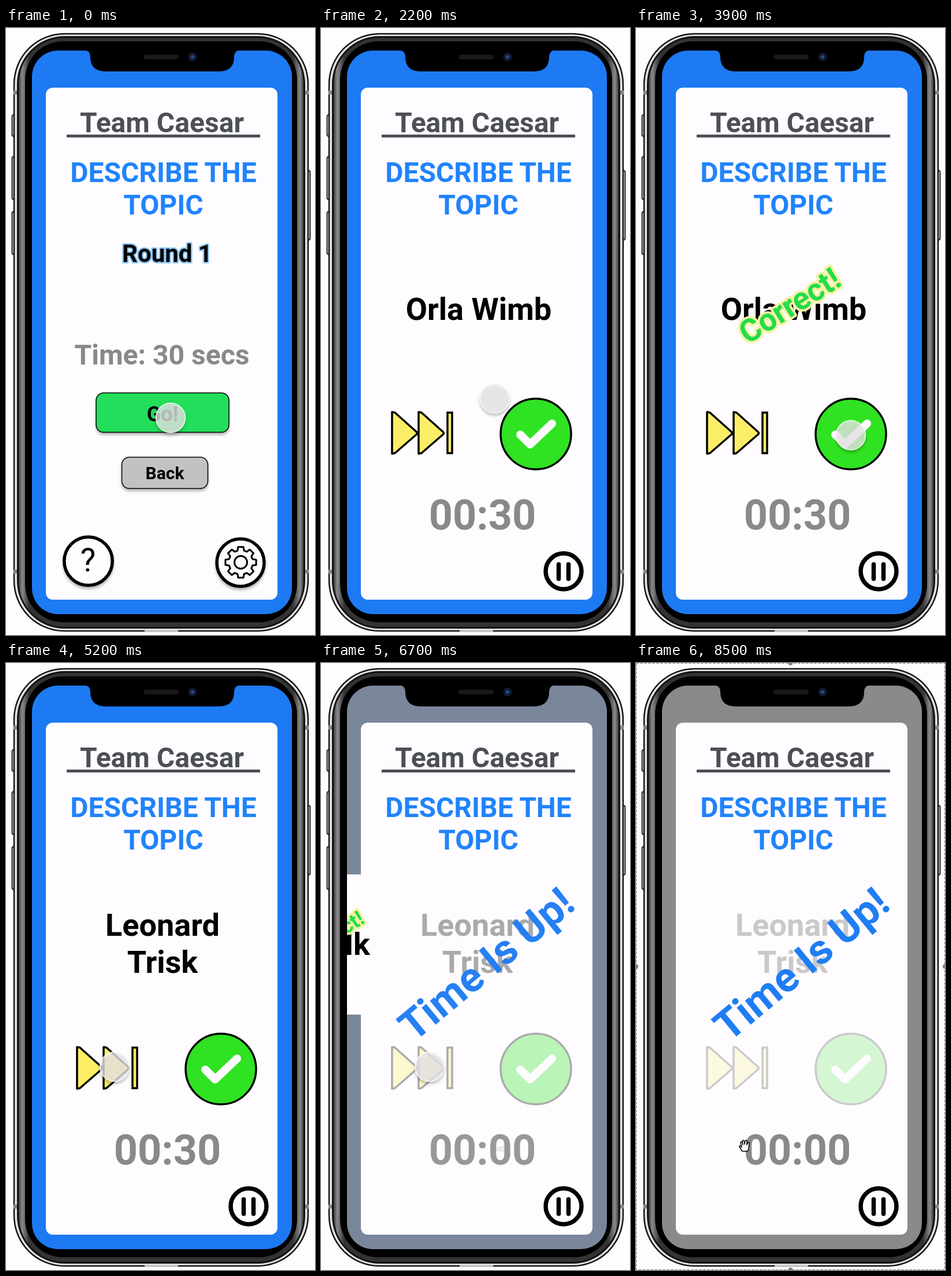
Animation, 535 px wide and 1048 px high, one loop 8600 ms. Source, as an HTML page:

```html
<!DOCTYPE html>
<html lang="en">
<head>
<meta charset="utf-8">
<title>Describe the topic</title>
<style>
  html, body { margin: 0; width: 100%; height: 100%; overflow: hidden; background: #fefcff; }
  svg { display: block; width: 535px; height: 1048px; }
  text { font: 700 48px Roboto, sans-serif; text-anchor: middle; }
  .topic text { font-size: 54px; }
  .clock { font-size: 72px; fill: #8a888a; }
  .paper { fill: #fefcff; }
  .shadow { filter: drop-shadow(0 4px 2px rgba(0, 0, 0, .27)); }
  .stamp { fill: #23dc4d; stroke: #f5f2a0; stroke-width: 8; paint-order: stroke; stroke-linejoin: round; }
</style>
</head>
<body>
<svg viewBox="0 0 535 1048">
  <defs>
    <clipPath id="display"><rect x="45" y="39" width="450" height="973" rx="45"/></clipPath>
    <linearGradient id="rim">
      <stop offset="0" stop-color="#2b2a2b"/><stop offset=".015" stop-color="#8b898b"/>
      <stop offset=".04" stop-color="#333"/><stop offset=".96" stop-color="#333"/>
      <stop offset=".985" stop-color="#8b898b"/><stop offset="1" stop-color="#2b2a2b"/>
    </linearGradient>
  </defs>

  <!-- phone body -->
  <g fill="#e9e7ea" stroke="#222" stroke-width="2">
    <rect x="10.5" y="150" width="8" height="37" rx="3"/>
    <rect x="10.5" y="222" width="8" height="74" rx="3"/>
    <rect x="10.5" y="317" width="8" height="74" rx="3"/>
    <rect x="518" y="246" width="8.5" height="120" rx="3"/>
  </g>
  <rect x="14" y="10" width="509" height="1031" rx="87" fill="#e3e1e4" stroke="#151515" stroke-width="2.5"/>
  <g fill="#858386">
    <path d="M13 108h9v7h-9zM515 108h9v7h-9zM13 935h9v7h-9zM515 935h9v7h-9z"/>
    <rect x="240" y="1039" width="58" height="3" fill="#c9c7ca"/>
  </g>
  <rect x="20.5" y="15.5" width="496" height="1020" rx="81" fill="url(#rim)" stroke="#111" stroke-width="3"/>
  <rect x="33" y="23" width="471" height="1003" rx="66"/>

  <g clip-path="url(#display)">
    <rect id="backdrop" x="45" y="39" width="450" height="973"/>
    <rect class="paper" x="69" y="103" width="401" height="884" rx="12"/>
    <text x="270" y="180" fill="#4c5056">Team Caesar</text>
    <rect x="105" y="184" width="335" height="5" fill="#4c5056"/>
    <g fill="#2083fb"><text x="272.500" y="266">DESCRIBE THE</text><text x="272.500" y="322">TOPIC</text></g>

    <g id="intro">
      <text x="279" y="404" style="font-size:42px" stroke="#8fc8fb" stroke-width="5" stroke-linejoin="round" paint-order="stroke">Round 1</text>
      <text x="270" y="581" fill="#8a888a">Time: 30 secs</text>
      <g stroke="#000" stroke-width="1.5" class="shadow">
        <rect x="156" y="630" width="230" height="68" rx="13" fill="#22de5a"/>
        <rect x="200.500" y="741" width="149" height="54" rx="13" fill="#c3c1c3"/>
      </g>
      <text x="271" y="679" style="font-size:36px">Go!</text>
      <text x="275" y="779" style="font-size:30px">Back</text>
      <g class="shadow paper" stroke="#000" stroke-width="5.500">
        <circle cx="142.500" cy="920.500" r="41.700"/><circle cx="406" cy="923" r="41"/>
      </g>
      <text x="142" y="938" style="font-size:56px;font-weight:400">?</text>
      <g fill="none" stroke="#000" stroke-width="3" stroke-linejoin="round" transform="translate(406.500 922.500)">
        <path id="gear"/><circle r="11"/>
      </g>
    </g>

    <g id="game">
      <g id="first" class="topic">
        <rect class="paper" x="132" y="365" width="280" height="242"/>
        <text x="273" y="504">Orla Wimb</text>
        <text id="praise" class="stamp" transform="translate(276 495) rotate(-32)">Correct!</text>
      </g>
      <g id="second" class="topic">
        <rect class="paper" x="132" y="365" width="280" height="242"/>
        <g class="dim"><text x="271" y="471">Leonard</text><text x="271" y="535">Trisk</text></g>
      </g>
      <g class="dim" stroke="#000" stroke-width="3.500" stroke-linejoin="round">
        <path fill="#fbee66" d="M123 663l5 1 37 33q3 3 0 5l-37 32-5 1zM169 663l5 1 37 33q3 3 0 5l-37 32-5 1z"/>
        <path fill="#fbee66" stroke-linejoin="miter" d="M219 664h8v70h-8z"/>
        <circle cx="372" cy="701" r="61" fill="#2fe222"/>
      </g>
      <path d="M345 702l17 17 38-36" fill="none" stroke="#fefcff" stroke-width="14" stroke-linecap="round" stroke-linejoin="round"/>
      <g id="third" class="topic">
        <rect class="paper" x="132" y="365" width="280" height="242"/>
        <text x="272" y="504">Milk</text>
        <text class="stamp" style="font-size:36px" transform="translate(262 482) rotate(-32)">Correct!</text>
      </g>
      <text id="full" class="clock" x="279.500" y="866">00:30</text>
      <text id="empty" class="clock" x="279.500" y="866">00:00</text>
      <g fill="none" stroke="#000" stroke-width="7.500">
        <circle cx="420" cy="938" r="31"/>
        <path stroke-linecap="round" d="M411.500 926v25M428.500 926v25"/>
      </g>
      <text id="over" y="26" style="font-size:72px" fill="#1f7df3" transform="translate(285.500 519) rotate(-39.500)">Time Is Up!</text>
    </g>
  </g>

  <!-- notch -->
  <path d="M135 38q11 1 11 12q0 25 27 25h195q27 0 27-25q0-11 11-12z"/>
  <rect x="238" y="46" width="61" height="8" rx="4" fill="#19181a"/>
  <circle cx="323" cy="50" r="7.500" fill="#121a30"/><circle cx="323" cy="50" r="3" fill="#274a8c"/>

  <circle id="touch" r="25.500" class="shadow" fill="#eeecef" fill-opacity=".77" stroke="#fff" stroke-opacity=".85" stroke-width="1.500"/>
  <g id="editor">
    <rect x=".5" y=".5" width="534" height="1047" fill="none" stroke="#777" stroke-dasharray="4 3"/>
    <g fill="#858386">
      <circle cx="267.500" r="4"/><circle cx="267.500" cy="1048" r="4"/>
      <circle cy="524" r="4"/><circle cx="535" cy="524" r="4"/>
    </g>
    <path transform="translate(188 834)" fill="#fff" stroke="#000" stroke-width="1.500" stroke-linejoin="round"
      d="M-4 9l-5-8q0-3 3 0l1 1-2-8q1-3 3 0l1 4-1-7q2-2 3 0l1 6 1-6q2-2 3 0v7l2-4q3-1 2 2l-1 9-2 4z"/>
  </g>
</svg>
<script>
const LOOP = 8600, STEP = 100;
const el = id => document.getElementById(id);
const progress = (t, start, end) => Math.min(1, Math.max(0, (t - start) / (end - start)));
const easeOut = x => 1 - (1 - x) ** 1.7;
const smooth = x => x * x * (3 - 2 * x);
const mix = (a, b, p) => a + (b - a) * p;
const fade = (id, value) => el(id).setAttribute("opacity", value);
const shift = (id, x) => el(id).setAttribute("transform", `translate(${x} 0)`);

// Eight teeth, each with a narrow tip and a wide root.
const gearPoints = [];
for (let tooth = 0; tooth < 8; tooth++) {
  for (const [radius, offset] of [[21, -.27], [27, -.17], [27, .17], [21, .27]]) {
    const angle = tooth * Math.PI / 4 + offset;
    gearPoints.push(`${radius * Math.cos(angle)} ${radius * Math.sin(angle)}`);
  }
}
el("gear").setAttribute("d", `M${gearPoints.join("L")}Z`);

// Pointer moves: start, end, destination x, destination y.
const pointerStart = [285, 673];
const moves = [[600, 1100, 281, 622], [1900, 2900, 372, 703], [4400, 5100, 188, 697], [7500, 8200, 188, 834]];

function pointerAt(t) {
  let [x, y] = pointerStart;
  for (const [start, end, toX, toY] of moves) {
    const p = smooth(progress(t, start, end));
    x = mix(x, toX, p);
    y = mix(y, toY, p);
  }
  return [x, y];
}

function draw(t) {
  const begin = progress(t, 300, 700);
  fade("intro", 1 - begin);
  fade("game", begin);

  fade("praise", progress(t, 3300, 3700));
  const next = easeOut(progress(t, 4100, 4700));
  shift("first", mix(0, -368, next));
  shift("second", mix(463, 0, next));

  const ending = easeOut(progress(t, 6300, 6900));
  shift("third", mix(463, -368, ending));
  const grey = [29, 122, 243].map((c, i) => Math.round(mix(c, [139, 137, 139][i], ending)));
  el("backdrop").setAttribute("fill", `rgb(${grey})`);
  for (const node of document.querySelectorAll(".dim")) node.setAttribute("opacity", 1 - .8 * ending);
  fade("full", 1 - ending);
  fade("empty", ending);
  fade("over", Math.min(1, ending * 1.15));

  const editing = t >= 8200;
  fade("editor", editing ? 1 : 0);
  fade("touch", editing ? 0 : 1);
  el("touch").setAttribute("transform", `translate(${pointerAt(t)})`);
}

function frame() {
  draw(Math.floor(performance.now() % LOOP / STEP) * STEP);
  requestAnimationFrame(frame);
}
frame();
</script>
</body>
</html>
```
